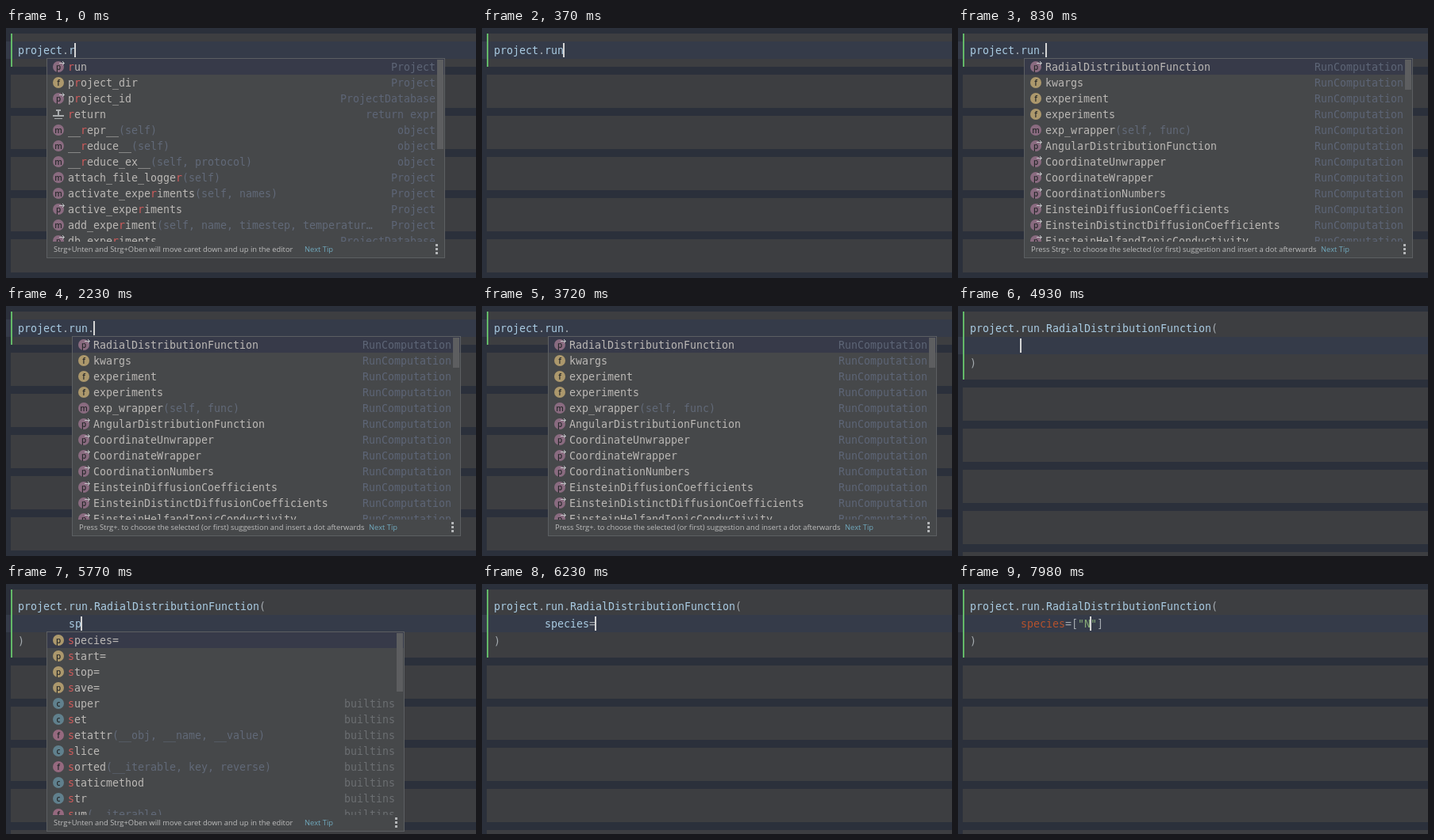
Recreate the animation shown at these times as an HTML page with a canvas. Size 592 px wide and 316 px high, loop 8000 ms.

```html
<!DOCTYPE html>
<html lang="en">
<head>
<meta charset="utf-8">
<title>Code completion</title>
<style>
  html, body { margin: 0; width: 100%; height: 100%; overflow: hidden; background: #2b303b; }
  canvas { display: block; }
</style>
</head>
<body>
<canvas id="stage" width="592" height="316"></canvas>
<script>
// An opaque canvas allows subpixel text
const ctx = document.getElementById("stage").getContext("2d", { alpha: false });
const LOOP = 8000, CHAR = 8, CODE_X = 15, LINE = 22, ROW = 20;
const MONO = '13.29px "DejaVu Sans Mono", monospace';
const TIP = '9.4px "Open Sans", sans-serif';
const LETTER = '600 10px "Open Sans", sans-serif';
const COLOR = {
  page: "#2b303b", cell: "#3d3e41", line: "#353b49", bar: "#63b868", bracket: "#465566",
  name: "#a9cbe2", mark: "#a3a9ae", string: "#88ad78", keyword: "#b4522d", caret: "#d4d4d4",
  popup: "#46484a", border: "#5c5f62", selected: "#373a49", thumb: "#5d5e60",
  item: "#bbb8b5", match: "#cf5b5b", params: "#616978", tip: "#bdbdbd", link: "#70a9bd"
};
const ICON = { p: "#8a6b80", m: "#8a6b80", F: "#96697f", f: "#ac986c", P: "#ac986c", c: "#60808d" };

// Each item: "icon|name|parameters|tail"
const list = (tail, rows) => rows.trim().split("\n").map(row => {
  const [icon, name, params = "", own] = row.trim().split("|");
  return { icon, name, params, tail: own ?? tail };
});

const caretTip = "Strg+Unten and Strg+Oben will move caret down and up in the editor";
const members = {
  left: 51, right: 553, top: 38, thumb: 113, match: "r", tip: caretTip, link: 376, tailColor: "#5d6576",
  items: list("Project", `
    p|run
    f|project_dir
    p|project_id||ProjectDatabase
    t|return||return expr
    m|__repr__|(self)|object
    m|__reduce__|(self)|object
    m|__reduce_ex__|(self, protocol)|object
    m|attach_file_logger|(self)
    m|activate_experiments|(self, names)
    p|active_experiments
    m|add_experiment|(self, name, timestep, temperatur…
    p|db_experiments||ProjectDatabase`)
};
const computations = {
  left: 83, right: 573, top: 38, thumb: 38, match: "", link: 457, tailColor: "#5d6576",
  tip: "Press Strg+. to choose the selected (or first) suggestion and insert a dot afterwards",
  items: list("RunComputation", `
    p|RadialDistributionFunction
    f|kwargs
    f|experiment
    f|experiments
    m|exp_wrapper|(self, func)
    p|AngularDistributionFunction
    p|CoordinateUnwrapper
    p|CoordinateWrapper
    p|CoordinationNumbers
    p|EinsteinDiffusionCoefficients
    p|EinsteinDistinctDiffusionCoefficients
    p|EinsteinHelfandIonicConductivity`)
};
const args = {
  left: 51, right: 502, top: 60, thumb: 74, match: "s", tip: caretTip, link: 376, tailColor: "#6b6e71",
  items: list("builtins", `
    P|species=||
    P|start=||
    P|stop=||
    P|save=||
    c|super
    c|set
    F|setattr|(__obj, __name, __value)
    c|slice
    F|sorted|(__iterable, key, reverse)
    c|staticmethod
    c|str
    F|sum|(__iterable)`)
};
const species = { ...args, thumb: 0, match: "spe", items: args.items.slice(0, 1) };

// "|" in the text marks the caret
const call = "project.run.RadialDistributionFunction";
const inside = arg => [call + "(", " ".repeat(8) + arg, ")"];
const steps = [
  { at: 0, text: ["project.r|"], popup: members },
  { at: 370, text: ["project.run|"] },
  { at: 740, text: ["project.run.|"] },
  { at: 830, text: ["project.run.|"], popup: computations },
  { at: 3810, text: [call + "|"] },
  { at: 4560, text: [call + "(|)"], bracket: 38 },
  { at: 4930, text: inside("|") },
  { at: 5680, text: inside("s|") },
  { at: 5770, text: inside("sp|"), popup: args },
  { at: 5860, text: inside("spe|"), popup: species },
  { at: 6230, text: inside("species=|") },
  { at: 6600, text: inside("species=|"), error: 16 },
  { at: 7160, text: inside("species=[|]"), bracket: 16, error: 18 },
  { at: 7430, text: inside("species=[|]"), bracket: 16, keyword: true },
  { at: 7520, text: inside('species=["|"]'), keyword: true },
  { at: 7980, text: inside('species=["N|"]'), keyword: true }
];
const caretOff = [[1670, 2230], [2690, 3160], [3720, 3810]];

function box(x, y, w, h, color) {
  ctx.fillStyle = color;
  ctx.fillRect(x, y, w, h);
}

function write(text, x, y, color, font = MONO, align = "left") {
  ctx.font = font;
  ctx.textAlign = align;
  ctx.fillStyle = color;
  ctx.fillText(text, x, y);
}

function stroke(color, width, points) {
  ctx.strokeStyle = color;
  ctx.lineWidth = width;
  ctx.beginPath();
  points.forEach(([x, y]) => ctx.lineTo(x, y));
  ctx.stroke();
}

function drawCode(line, y, keyword) {
  for (const part of line.matchAll(/"\w*"|\w+|[^\w\s"]/g)) {
    const token = part[0];
    const color = token[0] === '"' ? COLOR.string
      : !/\w/.test(token) ? COLOR.mark
      : keyword && token === "species" ? COLOR.keyword : COLOR.name;
    write(token, CODE_X + part.index * CHAR, y, color);
  }
}

function drawEditor(step, showCaret) {
  const { text, bracket, error, keyword } = step;
  const cellHeight = 20 + text.length * LINE;
  const active = text.findIndex(line => line.includes("|"));
  const top = 17 + active * LINE;
  const columnX = column => CODE_X + column * CHAR;

  box(0, 0, 592, 316, COLOR.page);
  box(6, 7, 586, cellHeight, COLOR.cell);
  for (let y = 17 + cellHeight; y < 316; y += 52) box(6, y, 586, 42, COLOR.cell);
  box(0, top, 592, LINE, COLOR.line);
  box(6, 7, 2, cellHeight, COLOR.bar);

  if (bracket) box(columnX(bracket), top, 2 * CHAR, LINE, COLOR.bracket);
  text.forEach((line, i) => drawCode(line.replace("|", ""), 33 + i * LINE, keyword));
  if (error) {
    const wave = [0, 1, 2, 3].map(i => [columnX(error) + 0.5 + i * 2, top + (i % 2 ? 18.5 : 20.5)]);
    stroke("#c75450", 1, wave);
  }
  if (showCaret) box(columnX(text[active].indexOf("|")) - 1, top + 2, 2, 18, COLOR.caret);
}

function drawIcon(kind, x, y) {
  if (kind === "t") {
    box(x - 3, y - 6, 6, 2, "#a9acae");
    box(x - 1, y - 6, 2, 8, "#a9acae");
    box(x - 7, y + 1, 14, 2, "#a9acae");
    box(x - 5, y + 5, 10, 1, "#a9acae");
    return;
  }
  ctx.fillStyle = ICON[kind];
  ctx.beginPath();
  ctx.arc(x, y, 7, 0, Math.PI * 2);
  ctx.fill();
  write(kind.toLowerCase(), x, y + 3.5, "#26282a", LETTER, "center");
  if (kind === "p") {
    stroke("#c3c6c8", 1, [[x + 1, y - 4.5], [x + 7, y - 4.5]]);
    stroke("#c3c6c8", 1, [[x + 5, y - 7], [x + 7.5, y - 4.5], [x + 5, y - 2]]);
  }
}

function drawPopup({ left, right, top, thumb, match, tip, link, items, tailColor }) {
  const width = right - left;
  const height = Math.min(253, items.length * ROW + 23);
  const bottom = top + height;
  box(left, top, width, height, COLOR.border);
  box(left + 1, top + 1, width - 2, height - 2, COLOR.popup);

  ctx.save();
  ctx.beginPath();
  ctx.rect(left + 1, top + 1, width - 2, height - 22);
  ctx.clip();
  box(left + 1, top + 1, width - 2, ROW, COLOR.selected);
  items.forEach(({ icon, name, params, tail }, i) => {
    const middle = top + 11 + i * ROW, base = middle + 5, x = left + 27;
    drawIcon(icon, left + 15, middle);
    write(name, x, base, COLOR.item);
    if (match) {
      // Repaint the matched letters over a clean patch
      const at = name.indexOf(match), mx = x + at * CHAR;
      box(mx, middle - 9, match.length * CHAR, 18, i ? COLOR.popup : COLOR.selected);
      write(match, mx, base, COLOR.match);
    }
    write(params, x + name.length * CHAR, base, COLOR.params);
    write(tail, right - 12, base, tailColor, MONO, "right");
  });
  ctx.restore();

  box(right - 10, top + 2, 8, thumb, COLOR.thumb);
  write(tip, left + 9, bottom - 8, COLOR.tip, TIP);
  write("Next Tip", link, bottom - 8, COLOR.link, TIP);
  for (const dy of [18, 13, 8]) box(right - 12, bottom - dy, 3, 3, "#b4b6b8");
}

function draw(now) {
  const t = now % LOOP;
  const step = steps.findLast(s => s.at <= t) || steps[0];
  drawEditor(step, !caretOff.some(([from, to]) => t >= from && t < to));
  if (step.popup) drawPopup(step.popup);
  requestAnimationFrame(draw);
}
draw(0);
</script>
</body>
</html>
```
